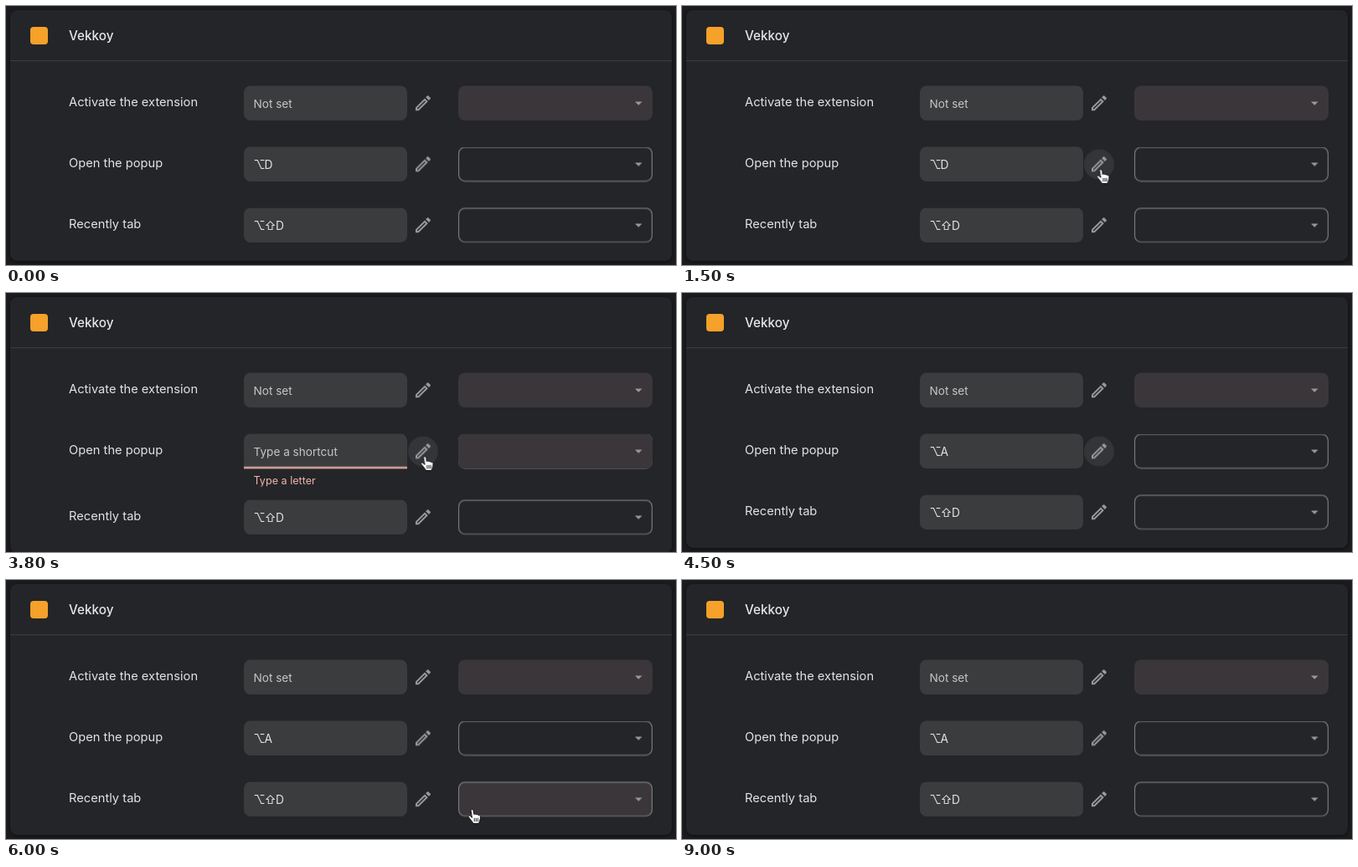
An HTML page for the animation above (9600 ms loop, 800 by 310 pixels).

```html
<!DOCTYPE html>
<html lang="en">
<head>
<meta charset="utf-8">
<title>Keyboard shortcuts</title>
<style>
  html, body { margin: 0; width: 100%; height: 100%; overflow: hidden; background: #1b1c1f; }
  svg { display: block; width: 800px; height: 310px; font-family: Inter, Roboto, sans-serif; }

  .card { fill: #242528; filter: drop-shadow(0 1px 2px rgba(0, 0, 0, .5)); }
  .title { font-size: 15.3px; font-weight: 500; fill: #e6e6e7; }
  .label { font-size: 14.7px; fill: #e3e3e4; }
  .hint { font-size: 13.6px; fill: #c6c6c7; }
  .keys { font-size: 13.8px; fill: #e3e3e4; font-family: Inter, "DejaVu Sans", sans-serif; }
  .error { font-size: 12.6px; fill: #f0b4ae; }
  .field { fill: #3b3c3d; }
  .solid { fill: #3a363a; }
  .outline { fill: none; stroke: #77787b; stroke-width: 1.2; }
  .icon { fill: #98999b; }
  .glow { fill: #fff; fill-opacity: .075; }

  /* One loop is 9.6 s; the screen refreshes every 100 ms. */
  .anim { animation: 9.6s step-end infinite; }
  .card { animation-name: grow; }
  .shift { animation-name: shift; }
  .old { animation-name: old; }
  .new { animation-name: new; }
  .focus { animation-name: focus; }
  .caret { fill: #a3bcf8; animation-name: caret; }
  .line { transform-origin: 381.5px 0; animation-name: line; }
  .error { animation-name: error; }
  .hover { animation-name: hover; }
  .ripple { transform-box: fill-box; transform-origin: center; animation-name: ripple; }
  .pick { animation-name: pick; }
  .pointer { animation-name: move; }
  .hand { animation-name: hand; }
  .arrow { animation-name: arrow; }

  @keyframes grow { 0%, 41.66% { height: 300px; } 36.45% { height: 306px; } }
  @keyframes shift { 0%, 41.66% { transform: none; } 36.45% { transform: translateY(6px); } }
  @keyframes old { 0% { opacity: 1; } 21.87%, 100% { opacity: 0; } }
  @keyframes new { 0% { opacity: 0; } 41.66%, 100% { opacity: 1; } }
  @keyframes focus { 0%, 41.66%, 100% { opacity: 0; } 21.87% { opacity: 1; } }
  @keyframes caret {
    0%, 29.16%, 36.45%, 100% { opacity: 0; }
    21.87%, 34.37% { opacity: 1; }
  }
  @keyframes line {
    0% { transform: scaleX(0); opacity: 0; fill: #a3bcf8; }
    21.87% { transform: scaleX(.1); opacity: .5; fill: #a3bcf8; }
    22.91% { transform: scaleX(.65); opacity: 1; fill: #a3bcf8; }
    23.95% { transform: none; opacity: 1; fill: #a3bcf8; }
    36.45% { transform: none; opacity: 1; fill: #f0b4ae; }
    41.66% { transform: none; opacity: .3; fill: #a3bcf8; }
    42.7%, 100% { transform: scaleX(0); opacity: 0; fill: #a3bcf8; }
  }
  @keyframes error { 0%, 41.66%, 100% { opacity: 0; } 36.45% { opacity: 1; } }
  @keyframes hover {
    0%, 60.41%, 100% { opacity: 0; }
    9.37%, 59.37% { opacity: .5; }
    10.41% { opacity: 1; }
  }
  @keyframes ripple {
    0%, 27.08%, 100% { transform: scale(.2); opacity: 0; }
    20.83% { transform: scale(.5); opacity: .7; animation-timing-function: steps(3); }
    23.95% { transform: none; opacity: .4; animation-timing-function: steps(3); }
  }
  @keyframes pick { 0%, 63.54%, 100% { opacity: 0; } 61.45% { opacity: 1; } }
  @keyframes move {
    0% { transform: translate(544px, 330px); }
    1.04% { transform: translate(541px, 300px); animation-timing-function: steps(3); }
    4.16% { transform: translate(534px, 280px); animation-timing-function: steps(3); }
    7.29% { transform: translate(514px, 232px); animation-timing-function: steps(2); }
    9.37% { transform: translate(502px, 203px); animation-timing-function: steps(6); }
    15.62% { transform: translate(499.5px, 196px); }
    58.33% { transform: translate(502px, 200px); animation-timing-function: steps(3); }
    61.45% { transform: translate(546px, 266px); }
    62.5% { transform: translate(556px, 275px); }
    63.54% { transform: translate(561px, 289px); }
    64.58% { transform: translate(563px, 303px); }
    65.62%, 100% { transform: translate(544px, 330px); }
  }
  @keyframes hand {
    0%, 41.66%, 59.37%, 63.54%, 100% { opacity: 0; }
    9.37%, 58.33%, 61.45% { opacity: 1; }
  }
  @keyframes arrow {
    0%, 9.37%, 61.45%, 65.62%, 100% { opacity: 0; }
    1.04%, 59.37%, 63.54% { opacity: 1; }
  }
</style>
</head>
<body>
<svg viewBox="0 0 800 310">
  <defs>
    <rect id="field" class="field" x="284" y="-21" width="195" height="41.5" rx="8"/>
    <g id="pencil" class="icon" transform="translate(486 -12.3)">
      <path d="M3 17.25V21h3.75L17.81 9.94l-3.75-3.75L3 17.25zM5.92 19H5v-.92l9.06-9.06.92.92L5.92 19zM20.71 5.63l-2.34-2.34c-.2-.2-.45-.29-.71-.29s-.51.1-.7.29l-1.83 1.83 3.75 3.75 1.83-1.83c.39-.39.39-1.02 0-1.41z"/>
    </g>
    <path id="chevron" class="icon" d="M751 -2h8.6l-4.3 4.3z"/>
    <rect id="solid" class="solid" x="540" y="-21" width="232" height="41.5" rx="8"/>
    <rect id="outline" class="outline" x="540.6" y="-20.4" width="230.8" height="40.4" rx="7.5"/>
  </defs>

  <rect class="card anim" x="5" y="5" width="790" height="300" rx="8"/>
  <rect x="5" y="65" width="790" height="1" fill="#3c3d40"/>
  <rect x="29" y="25" width="21" height="21" rx="4" fill="#f5a12a"/>
  <text class="title" x="75" y="40.5">Vekkoy</text>

  <g transform="translate(0 116.5)">
    <text class="label" x="75" y="3.2">Activate the extension</text>
    <use href="#field"/>
    <text class="hint" x="295.5" y="5">Not set</text>
    <use href="#pencil"/>
    <use href="#solid"/>
    <use href="#chevron"/>
  </g>

  <g transform="translate(0 189.5)">
    <text class="label" x="75" y="3.2">Open the popup</text>
    <use href="#field"/>
    <text class="keys old anim" x="295.5 308.5" y="5">⌥D</text>
    <text class="keys new anim" x="295.5 308.5" y="5">⌥A</text>
    <use href="#outline"/>
    <g class="focus anim">
      <rect class="field" x="284" y="8" width="195" height="12.5"/>
      <text class="hint" x="295.5" y="5">Type a shortcut</text>
      <use href="#solid"/>
    </g>
    <rect class="caret anim" x="295" y="-8" width="1" height="16"/>
    <rect class="line anim" x="284" y="18.5" width="195" height="2.2"/>
    <text class="error anim" x="295.5" y="39">Type a letter</text>
    <circle class="glow hover anim" cx="498" cy="0" r="18"/>
    <circle class="glow ripple anim" cx="498" cy="0" r="18"/>
    <use href="#pencil"/>
    <use href="#chevron"/>
  </g>

  <g class="shift anim">
    <g transform="translate(0 262.5)">
      <text class="label" x="75" y="3.2">Recently tab</text>
      <use href="#field"/>
      <text class="keys" x="295.5 308.5 322" y="5">⌥⇧D</text>
      <use href="#pencil"/>
      <use class="pick anim" href="#solid"/>
      <use href="#outline"/>
      <use href="#chevron"/>
    </g>
  </g>

  <g class="pointer anim">
    <g class="hand anim">
      <g transform="translate(-5 -1)" stroke="#111" stroke-linejoin="round" stroke-linecap="round">
        <path fill="#fff" d="M4.1 2.2C3.8.2 6.7.1 7.1 2L8 6.7C8.2 5.5 10.2 5.6 10.5 7 10.9 6 12.8 6.3 13 7.7 13.7 6.9 15.4 7.5 15.4 9.2L15.3 11.6C15 14 13.9 15 13.7 17.5H6.8C6.4 15.5 4 13.7 2.7 11.5 1.9 10.3.7 9.5 1 8.6 1.4 7.5 3.2 8 4.1 9.2L5.2 10.2Z"/>
        <path fill="none" stroke-width=".9" d="M8.2 11.3l.1 3.6M10.3 11.2l.1 3.7M12.4 11.2v3.6"/>
      </g>
    </g>
    <path class="arrow anim" fill="#000" stroke="#fff" stroke-linejoin="round" d="M0 0V14.5L3.4 11.3 5.7 16.6 8 15.6 5.8 10.5H10.4Z"/>
  </g>
</svg>
</body>
</html>
```
